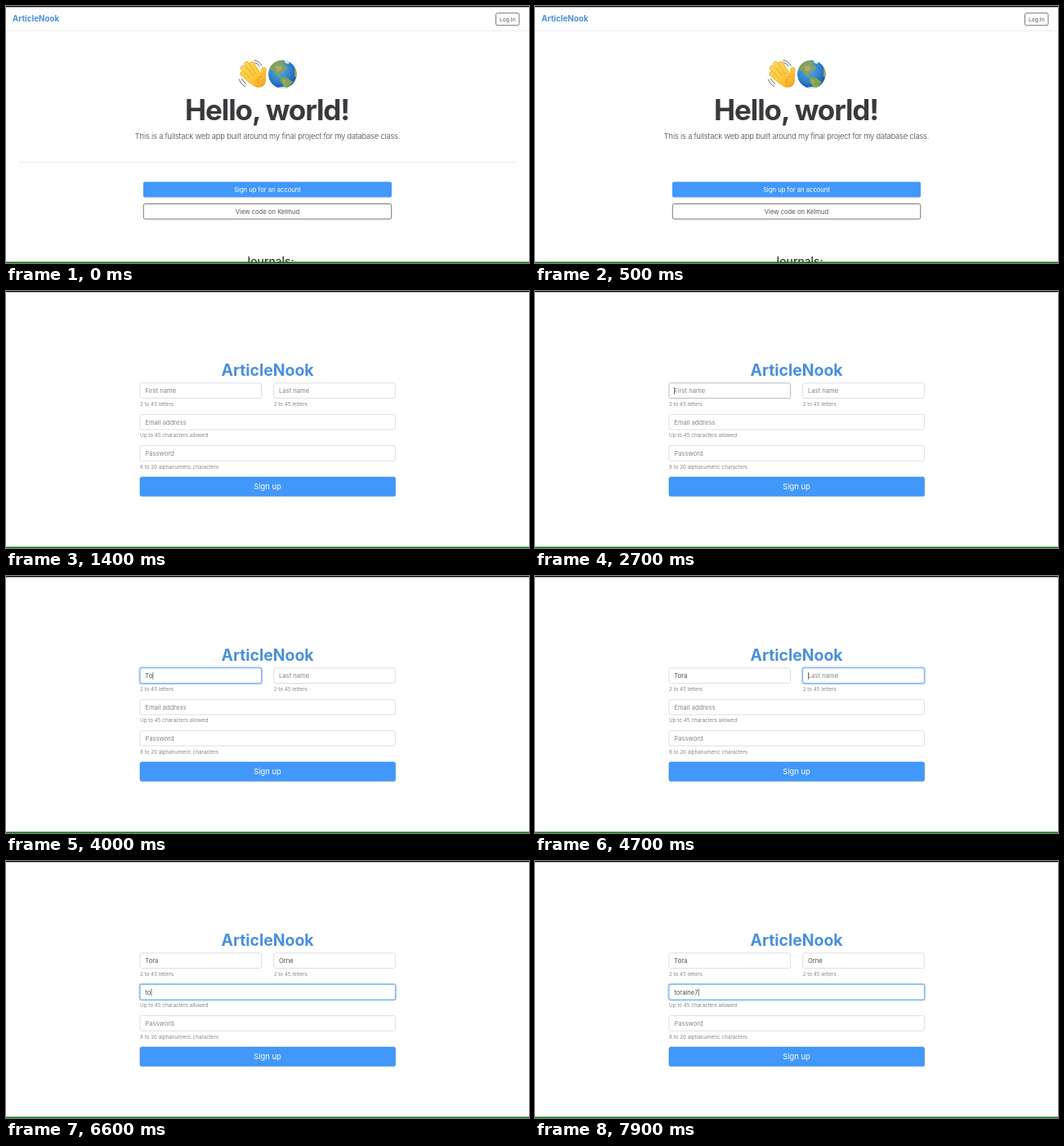
These frames come from a looping animation (640x315 px, 8 s). An HTML page:

```html
<!DOCTYPE html>
<html lang="en">
<head>
<meta charset="utf-8">
<title>Sign-up demo</title>
<style>
  html, body { margin: 0; width: 100%; height: 100%; overflow: hidden; background: #fff; }
  svg { display: block; width: 640px; height: 315px; font-family: Inter, "Open Sans", sans-serif; }
  text { white-space: pre; }
  .mid { text-anchor: middle; }
  .brand { font-weight: 700; fill: #4a90d9; }
  .label { font-size: 7.65px; font-weight: 400; }
  .help { font-size: 6.28px; fill: #858585; }
  .outline { fill: #fff; stroke: #777; }
  .box { fill: #fff; stroke-width: 1; }
  .glow { fill: none; stroke: #a9cdf4; stroke-width: 3; }
</style>
</head>
<body>
<svg viewBox="0 0 640 315">
  <defs>
    <radialGradient id="sea" cx=".4" cy=".35" r=".7">
      <stop offset="0" stop-color="#58aeea"/>
      <stop offset=".6" stop-color="#2f7fca"/>
      <stop offset="1" stop-color="#1b4f93"/>
    </radialGradient>
    <linearGradient id="skin" x1="285" y1="68" x2="316" y2="102" gradientUnits="userSpaceOnUse">
      <stop offset="0" stop-color="#ffdc56"/>
      <stop offset=".6" stop-color="#fdc83a"/>
      <stop offset="1" stop-color="#ee9d22"/>
    </linearGradient>
    <clipPath id="disc"><circle cx="338.3" cy="83.6" r="17.4"/></clipPath>
  </defs>

  <g id="home">
    <text class="brand" x="8" y="19.4" font-size="9.8">ArticleNook</text>
    <rect class="outline" x="599.5" y="8.7" width="28.5" height="15" rx="2"/>
    <text class="mid" x="613.8" y="18.7" font-size="6.8" fill="#555">Log In</text>
    <path d="M0 30.5H640" stroke="#ececec"/>

    <g id="hand" stroke-linecap="round" stroke-linejoin="round" fill="none"></g>

    <g clip-path="url(#disc)">
      <circle cx="338.3" cy="83.6" r="17.4" fill="url(#sea)"/>
      <path d="M322 78Q324 70 331 68L337 67L341 69L339 72L343 74L345 77L340 79L338 82L335 82L334 85L338 87L336 88L331 85L328 80Z" fill="#82a35c"/>
      <path d="M336 88L342 87L348 91L351 93L348 97L344 100L341 102L339 97L336 93Z" fill="#7fa353"/>
      <path d="M329 74L336 73L338 78L332 81Z" fill="#b7a66a"/>
      <path d="M338 90L342 91L341 98Z" fill="#b3a468"/>
      <path d="M340 66L347 67L346 71L342 70Z" fill="#e4eee9"/>
      <path d="M353 76L357 77L357 90L353 86Z" fill="#9b9c61"/>
      <path d="M330 101Q339 97 347 101" fill="#d9e8f2"/>
    </g>

    <text class="mid" x="319.5" y="139.8" font-size="35" font-weight="700" letter-spacing="-1.1" fill="#383a3d">Hello, world!</text>
    <text class="mid" x="320" y="163" font-size="9.4" font-weight="300" letter-spacing="-.19" fill="#444">This is a fullstack web app built around my final project for my database class.</text>
    <path id="rule" d="M15 191.5H625" stroke="#ebebeb"/>

    <rect id="halo" x="167" y="214.8" width="306" height="21" rx="3" fill="#8fbdf0"/>
    <rect id="join" x="168" y="215.6" width="304" height="18.8" rx="2"/>
    <text class="mid label" x="320" y="227.9" fill="#fff">Sign up for an account</text>
    <rect class="outline" x="168.3" y="242.5" width="303.4" height="18.6" rx="2"/>
    <text class="mid label" x="320" y="254.8" fill="#555">View code on Kelmud</text>
    <text class="mid" x="322" y="318" font-size="13.8" font-weight="500" fill="#333">Journals:</text>
  </g>

  <g id="form">
    <text class="mid brand" x="320" y="104" font-size="19.4">ArticleNook</text>
    <g id="fields"></g>
    <rect x="164" y="228" width="312.6" height="23.6" rx="2.2" fill="#4298fa" stroke="#3b86de" stroke-width=".6"/>
    <text class="mid" x="320" y="243.2" font-size="9.35" fill="#fff">Sign up</text>
  </g>

  <rect width="640" height="1.3" fill="#000"/>
  <rect y="313.5" width="640" height="1.5" fill="#0b7a0b"/>
</svg>
<script>
const LOOP = 8000, STEP = 100;
const $ = id => document.getElementById(id);

function add(parent, tag, attrs, text = '') {
  const el = document.createElementNS('http://www.w3.org/2000/svg', tag);
  for (const key in attrs) el.setAttribute(key, attrs[key]);
  el.textContent = text;
  parent.append(el);
  return el;
}

// Waving hand: each finger is a dark stroke under a lighter one.
const fingers = [
  'M289.5 83L301 93', 'M290 76L303 89', 'M294.5 71L307 86', 'M301 71L310 85', 'M315.5 78L314.5 90'
];
const palm = 'M299 90L310 83L316 88Q317 98 308 98Q303 97 299 90Z';
for (const d of fingers) {
  add($('hand'), 'path', { d, stroke: '#e49a24', 'stroke-width': 6 });
  add($('hand'), 'path', { d, stroke: 'url(#skin)', 'stroke-width': 4.9 });
}
add($('hand'), 'path', { d: palm, fill: 'url(#skin)', stroke: 'url(#skin)', 'stroke-width': 4 });
add($('hand'), 'path', { d: 'M313 86Q306 88 308 94', stroke: '#d98d22', 'stroke-width': 0.8 });
for (const d of ['M285.5 90Q287 96 293 98.5', 'M288.5 89Q290 93.5 294 95.5', 'M304 66.5Q310 67.5 313 73', 'M304.5 69.5Q308.5 70.5 310.5 74'])
  add($('hand'), 'path', { d, stroke: '#666', 'stroke-width': 1 });

const fields = [
  { x: 164, y: 112.8, w: 148.6, hint: 'First name', help: '2 to 45 letters', value: 'Tora',
    keys: [3600, 4000, 4100, 4200], focus: 2700, rise: [0, 1], blur: 4500 },
  { x: 327.7, y: 112.8, w: 148.6, hint: 'Last name', help: '2 to 45 letters', value: 'Orne',
    keys: [5200, 5500, 5600, 5700], focus: 4500, blur: 5900 },
  { x: 164, y: 151.3, w: 312.4, hint: 'Email address', help: 'Up to 45 characters allowed', value: 'toraine7',
    keys: [6400, 6600, 6800, 6900, 7100, 7200, 7300, 7900], focus: 5900, blur: LOOP },
  { x: 164, y: 189.6, w: 312.4, hint: 'Password', help: '8 to 20 alphanumeric characters', value: '',
    keys: [], focus: LOOP, blur: LOOP }
];
const blinks = [[3200, 3600], [5000, 5200], [7800, 7900]];

for (const f of fields) {
  const box = { x: f.x, y: f.y, width: f.w, height: 18.6, rx: 2.2 };
  f.glow = add($('fields'), 'rect', { ...box, class: 'glow' });
  f.box = add($('fields'), 'rect', { ...box, class: 'box' });
  f.text = add($('fields'), 'text', { x: f.x + 6.3, y: f.y + 12.2, class: 'label' });
  f.caret = add($('fields'), 'rect', { y: f.y + 5.2, width: 0.7, height: 8.8, fill: '#444' });
  add($('fields'), 'text', { x: f.x, y: f.y + 28, class: 'help' }, f.help);
}

const mix = (a, b, k) => `rgb(${a.map((v, i) => Math.round(v + (b[i] - v) * k))})`;

// Stepped ramp: zero before start, then the listed levels, then one.
function ramp(t, start, levels = [0.35, 0.8]) {
  const i = (t - start) / STEP;
  return i < 0 ? 0 : levels[i] ?? 1;
}

function drawField(f, t) {
  const level = ramp(t, f.focus, f.rise) * (1 - ramp(t, f.blur));
  const active = t >= f.focus && t < f.blur;
  const typed = f.value.slice(0, f.keys.filter(k => k <= t).length);
  const rest = active ? [185, 185, 185] : [222, 222, 222];
  f.box.style.stroke = mix(rest, [126, 178, 238], level);
  f.glow.style.opacity = level;
  f.text.textContent = typed || f.hint;
  f.text.style.fill = typed ? '#505050' : '#878787';
  const end = typed ? f.text.getComputedTextLength() + 0.3 : 0;
  f.caret.setAttribute('x', f.x + 6.3 + end);
  const hidden = blinks.some(([from, to]) => t >= from && t < to);
  f.caret.style.display = active && !hidden ? '' : 'none';
}

function draw(now) {
  const t = Math.floor(now % LOOP / STEP) * STEP;
  const home = t < 1400;
  $('home').style.display = home ? '' : 'none';
  $('form').style.display = home ? 'none' : '';
  if (home) {
    const hover = ramp(t, 1000);
    $('rule').style.display = t < 100 ? '' : 'none';
    $('join').style.fill = mix([66, 152, 250], [56, 134, 228], hover);
    $('halo').style.opacity = hover * 0.6;
  } else {
    fields.forEach(f => drawField(f, t));
  }
}

const begin = performance.now();
function tick() {
  draw(performance.now() - begin);
  requestAnimationFrame(tick);
}
tick();
</script>
</body>
</html>
```
